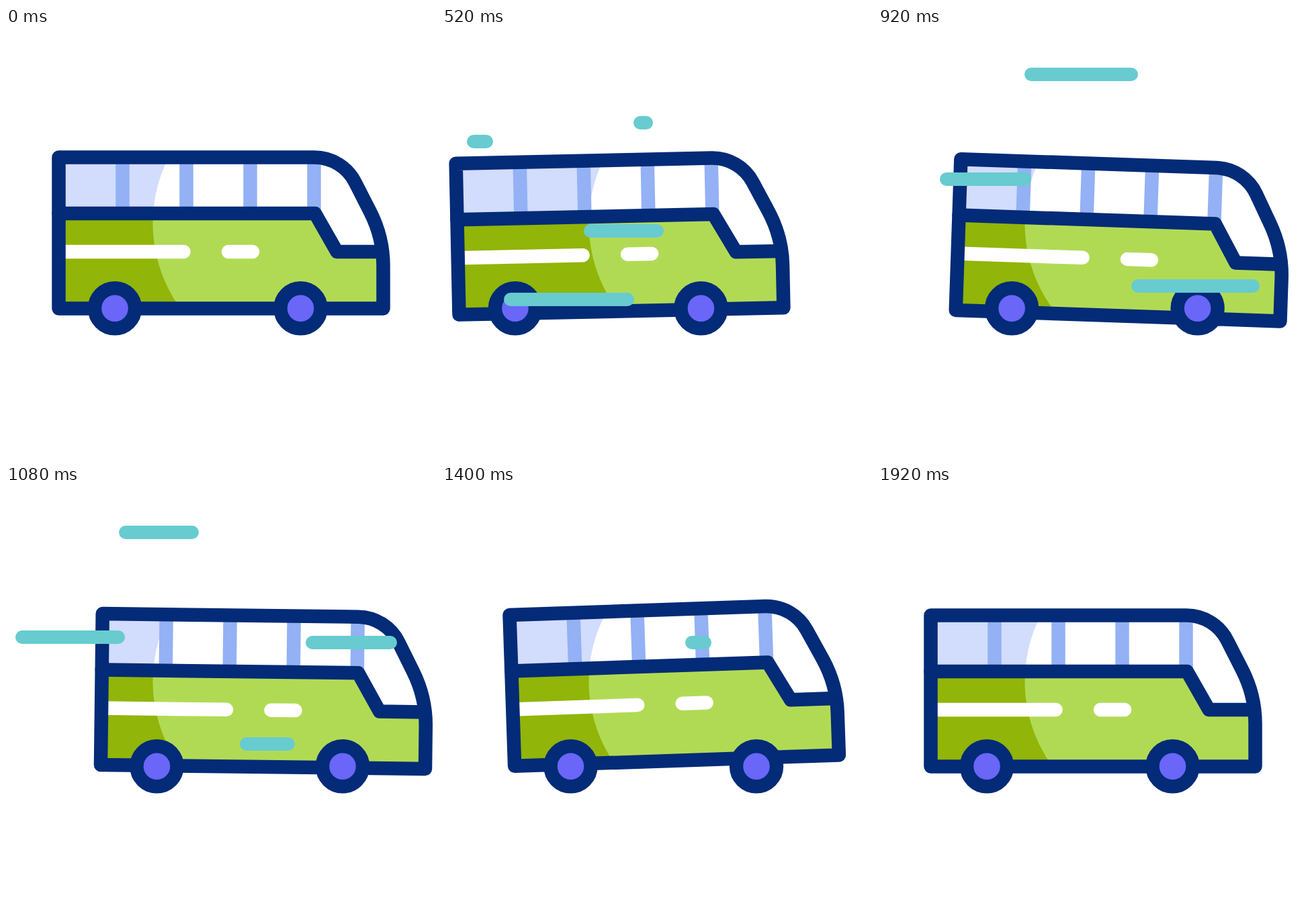
Animation of 640x640 px, one loop 2 s. Source, as an HTML page without scripts:

```html
<!DOCTYPE html>
<html lang="en">
<head>
<meta charset="utf-8">
<title>Bus</title>
<style>
  @property --x { syntax: "<length>"; inherits: true; initial-value: 0px; }
  @property --y { syntax: "<length>"; inherits: true; initial-value: 0px; }
  @property --a { syntax: "<angle>"; inherits: true; initial-value: 0deg; }

  html, body { margin: 0; width: 100%; height: 100%; overflow: hidden; background: #fff; }
  .stage {
    --soft: cubic-bezier(.33, 0, .67, 1);
    position: relative; width: 640px; height: 640px; overflow: hidden;
    animation: drive 2s infinite, bounce 2s infinite, tilt 2s infinite;
    animation-timing-function: var(--soft);
  }
  svg { position: absolute; left: 0; top: 0; display: block; }

  .bus, .still { transform-origin: 320px 417.5px; }
  .bus { transform: translate(var(--x), var(--y)) rotate(var(--a)); }
  /* undoes .bus, so the shade edge stays put on the stage */
  .still { transform: rotate(calc(-1 * var(--a))) translate(calc(-1 * var(--x)), calc(-1 * var(--y))); }
  .wheels { transform: translateX(var(--x)); }
  .line { fill: none; stroke: #032b77; stroke-width: 20.5; stroke-linejoin: round; stroke-linecap: round; }

  @keyframes drive {
    0% { --x: 0px; }
    25% { --x: -54px; animation-timing-function: cubic-bezier(.2, 0, .7, 1); }
    56% { --x: 64px; animation-timing-function: cubic-bezier(.3, 0, .55, 1); }
    86%, 100% { --x: 0px; }
  }
  @keyframes bounce {
    0% { --y: 0px; }
    18% { --y: 11.8px; }
    33.5% { --y: -3px; }
    47% { --y: 10.9px; }
    62.5% { --y: -13.1px; }
    82% { --y: -.4px; }
    96%, 100% { --y: 0px; }
  }
  @keyframes tilt {
    0% { --a: 0deg; }
    22% { --a: -1.45deg; }
    48% { --a: 2deg; }
    64% { --a: -2.05deg; animation-timing-function: cubic-bezier(.5, 0, .7, 1); }
    96%, 100% { --a: 0deg; }
  }

  /* wind streaks: the left end runs ahead, the right end follows */
  .wind {
    position: absolute; top: var(--t); height: 20.4px; border-radius: 10.2px;
    left: calc(var(--l) + 200px); right: calc(420px - var(--l));
    background: #67cbd0; opacity: 0;
    animation: head 2s var(--d) infinite, tail 2s calc(var(--d) + .215s) infinite, show 2s var(--d) step-end infinite;
  }
  @keyframes head {
    0% { left: calc(var(--l) + 200px); animation-timing-function: var(--soft); }
    18%, 100% { left: var(--l); }
  }
  @keyframes tail {
    0% { right: calc(420px - var(--l)); animation-timing-function: var(--soft); }
    18%, 50% { right: calc(620px - var(--l)); }
    50.01%, 100% { right: calc(420px - var(--l)); }
  }
  @keyframes show {
    0% { opacity: 0; }
    1.8% { opacity: 1; }
    28.6%, 100% { opacity: 0; }
  }
</style>
</head>
<body>
<div class="stage">
  <svg width="640" height="640" viewBox="0 0 640 640">
    <defs>
      <path id="shell" d="M78.5 192.5H459A68 68 0 0 1 519.8 230L542 273.5C555 299 561.5 326 561.5 354V417.5H78.5Z"/>
      <path id="shade" d="M-100 0H434.5V74.6A216 216 0 0 0 434.5 506.6V640H-100Z"/>
      <clipPath id="whole"><use href="#shell"/></clipPath>
      <clipPath id="lower"><path d="M78.5 276H460L492.5 333H561.5V417.5H78.5Z"/></clipPath>
    </defs>
    <g class="bus">
      <g clip-path="url(#whole)">
        <rect x="60" y="180" width="520" height="250" fill="#fff"/>
        <g class="still"><use href="#shade" fill="#d2dcfd"/></g>
        <path d="M173.5 192V272M268.5 192V272M363.5 192V272M458.5 192V272" stroke="#93b1f4" stroke-width="20.5"/>
      </g>
      <g clip-path="url(#lower)">
        <rect x="60" y="270" width="520" height="160" fill="#b1da54"/>
        <g class="still"><use href="#shade" fill="#91b508"/></g>
        <path d="M78.5 333H264.5M331 333H367" stroke="#fff" stroke-width="20.5" stroke-linecap="round"/>
      </g>
      <use href="#shell" class="line"/>
      <path class="line" d="M78.5 276H460L492.5 333H559"/>
    </g>
    <g class="wheels" fill="#6966f8" stroke="#032b77" stroke-width="20.4">
      <circle cx="162" cy="417.2" r="30"/>
      <circle cx="438.5" cy="417.2" r="30"/>
    </g>
  </svg>
  <div class="wind" style="--l:285px;--t:130.5px;--d:.04s"></div>
  <div class="wind" style="--l:37px;--t:158.7px;--d:.08s"></div>
  <div class="wind" style="--l:210px;--t:291.5px;--d:.2s"></div>
  <div class="wind" style="--l:77px;--t:394px;--d:.28s"></div>
  <div class="wind" style="--l:348px;--t:373.6px;--d:.72s"></div>
  <div class="wind" style="--l:167px;--t:59px;--d:.76s"></div>
  <div class="wind" style="--l:8px;--t:215px;--d:.8s"></div>
  <div class="wind" style="--l:362px;--t:222.7px;--d:.96s"></div>
</div>
</body>
</html>
```
